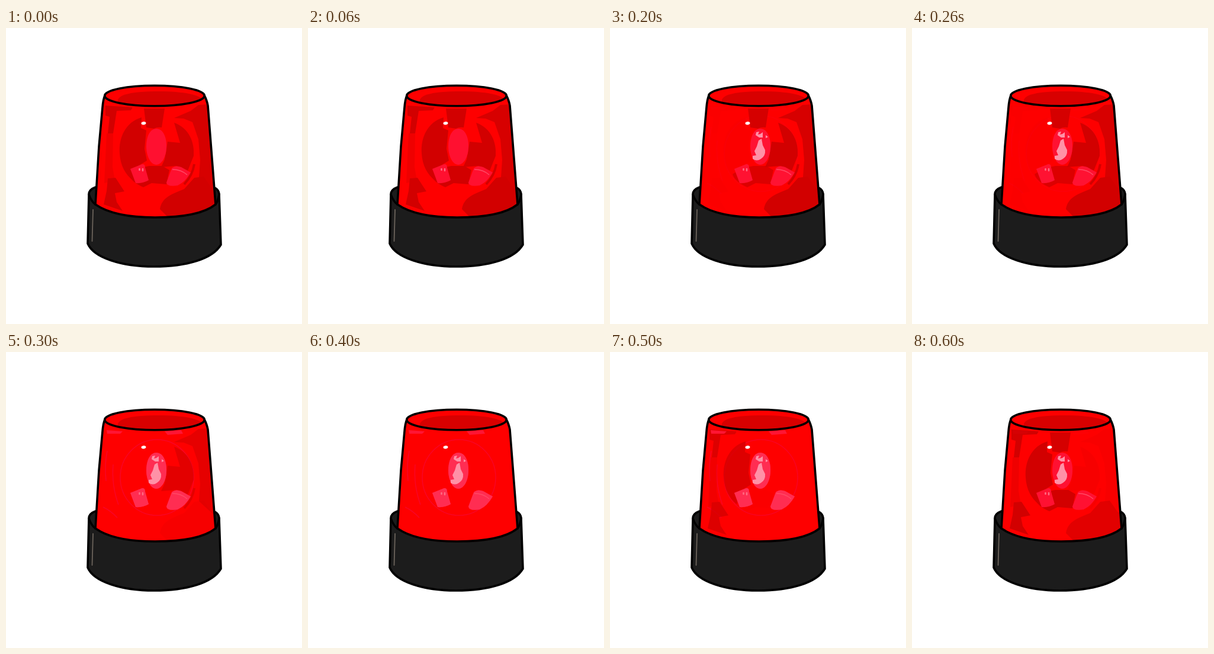
An HTML page that plays this animation: 500 by 500 pixels, repeating every 0.7 s.

```html
<!DOCTYPE html>
<html lang="en">
<head>
<meta charset="utf-8">
<title>Siren</title>
<style>
  html, body { margin: 0; width: 100%; height: 100%; overflow: hidden; background: #fff; }
  svg { display: block; width: 100%; height: 100%; }
  .line { fill: none; stroke: #000; stroke-width: 3.6; stroke-linecap: round; stroke-linejoin: round; }
  .shade { fill: #d20000; }
</style>
</head>
<body>
<svg viewBox="0 0 500 500">
  <defs>
    <path id="dome" d="M167 114Q164 121 163 134L157 200L151 298C174 314 210 320 252 320C298 320 334 314 354 298L346 195L341 131Q339 121 335 114C326 92 176 92 167 114Z"/>
    <clipPath id="inside"><use href="#dome"/></clipPath>
    <g id="panes">
      <path d="M254 170C265 170 272 184 271 203C270 220 262 231 254 231C244 231 237 216 237 200C237 182 244 170 254 170Z"/>
      <path d="M210 238L230 230Q235 229 235 236L241 257Q231 263 219 262Z"/>
      <path d="M280 237Q286 231 296 235L312 244Q303 260 290 266Q272 269 271 261Z"/>
    </g>
  </defs>

  <!-- base -->
  <path d="M151 269Q140 273 140 281L138 364C148 388 195 403 250 403C305 403 349 390 363 366L360 280Q359 273 353 270Z" fill="#1c1c1c" stroke="#000" stroke-width="3.6" stroke-linejoin="round"/>
  <path d="M147 307L145.500 360" stroke="#6b635b" stroke-width="1.800" stroke-linecap="round"/>

  <!-- dome: data-lit is when the beam faces a part -->
  <use href="#dome" fill="#fe0000"/>
  <g clip-path="url(#inside)">
    <g data-glow="3.8" fill="none" stroke="#f80526" stroke-width="1.500">
      <ellipse cx="255" cy="212" rx="62" ry="64"/>
      <path d="M171 167Q166 190 169 218M164 262Q177 268 188 280M181 190Q178 225 190 258"/>
    </g>
    <g data-lit="3.2" class="shade">
      <path d="M168 131L214 134L211 139L187 140L181 178L172 178L175 150L168 148Z"/>
      <path d="M170 178L181 178L180 235L184 258L166 262Z" opacity=".35"/>
      <path d="M172 254L185 253L200 276L184 279L187 294L197 309L165 298L170 275Z"/>
      <path d="M229 151C202 159 190 185 192 212C193 232 202 248 214 257L220 235L238 224L234 204L237 173L228 169Z"/>
    </g>
    <path data-lit="4" class="shade" d="M233 136L268 136L263 168Q255 167 250 170L237 168Z"/>
    <path data-lit="3.8" class="shade" d="M207 247Q211 260 232 269L246 262L271 264L276 240L264 233L242 233L222 237Z"/>
    <g data-lit="4.7" class="shade">
      <path d="M284 160C309 169 319 193 317 216L307 241L288 233L262 235L268 222L273 192L294 194Z"/>
      <path d="M284 152L312 140L325 130L341 129L347 205L352 276L326 252L328 223L325 188L315 159L300 153Z" opacity=".88"/>
      <path d="M301 264Q315 249 318 230" fill="none" stroke="#d20000" stroke-width="4"/>
    </g>
    <path data-lit="4.3" class="shade" d="M260 306C263 286 281 280 301 272L318 253L334 251L347 270L355 273L355 299Q326 318 273 319Z"/>
    <path data-glow="4" fill="#ff1534" opacity=".7" d="M170 132L197 134L193 138L171 138ZM268 134L296 132L299 138L273 140Z"/>
    <use href="#panes" fill="#ff1030"/>
    <use href="#panes" fill="#ff2d52" data-glow="4"/>
    <path d="M281 239Q296 239 306 248" fill="none" stroke="#ff4a66" stroke-width="1.600"/>
    <path d="M225.500 238v2M231 238v3" stroke="#ff6a82" stroke-width="2.600" stroke-linecap="round"/>
    <g id="shine" fill="#ff91a7">
      <path d="M251 190L256 187L258 198L262 206Q263 216 255 221Q248 226 241 221L241 216L247 215L244 208L248 200Z"/>
      <path d="M247 176L252 175L250 180L254 179L258 176L258 185L252 185L246 181ZM263 181L267 184L263 186Z"/>
    </g>
    <ellipse cx="232.500" cy="161" rx="4" ry="2.600" fill="#fff" transform="rotate(-8 232 161)"/>
  </g>

  <!-- rim -->
  <path class="shade" opacity=".85" d="M189 125C186 112 215 107 258 107C300 107 328 113 331 121C310 131 220 134 189 125Z"/>
  <ellipse class="line" cx="251" cy="114.500" rx="84.300" ry="17.200"/>
  <path class="line" d="M167 114Q164 121 163 134L157 200L151 298M335 114Q339 121 341 131L346 195L354 298"/>
  <path class="line" d="M140 281Q144 293 151 298C174 314 210 320 252 320C298 320 334 314 354 298Q358 293 360 281"/>
</svg>
<script>
  const STEP = 100, STEPS = 7;
  const lit = document.querySelectorAll("[data-lit]");
  const glowing = document.querySelectorAll("[data-glow]");
  const shine = document.getElementById("shine");

  // 0 while the beam faces a part, easing to 1 as it turns away
  function darkness(step, facing) {
    const gap = Math.abs(step - facing);
    const away = Math.min(gap, STEPS - gap);
    const x = Math.min(1, Math.max(0, (away - 1) / 1.2));
    return x * x * (3 - 2 * x);
  }

  function draw() {
    const step = Math.floor(performance.now() / STEP) % STEPS;
    for (const part of lit) part.style.opacity = darkness(step, part.dataset.lit);
    for (const part of glowing) part.style.opacity = 1 - darkness(step, part.dataset.glow);
    shine.style.opacity = Math.min(1, step * 0.5);
    requestAnimationFrame(draw);
  }
  draw();
</script>
</body>
</html>
```
